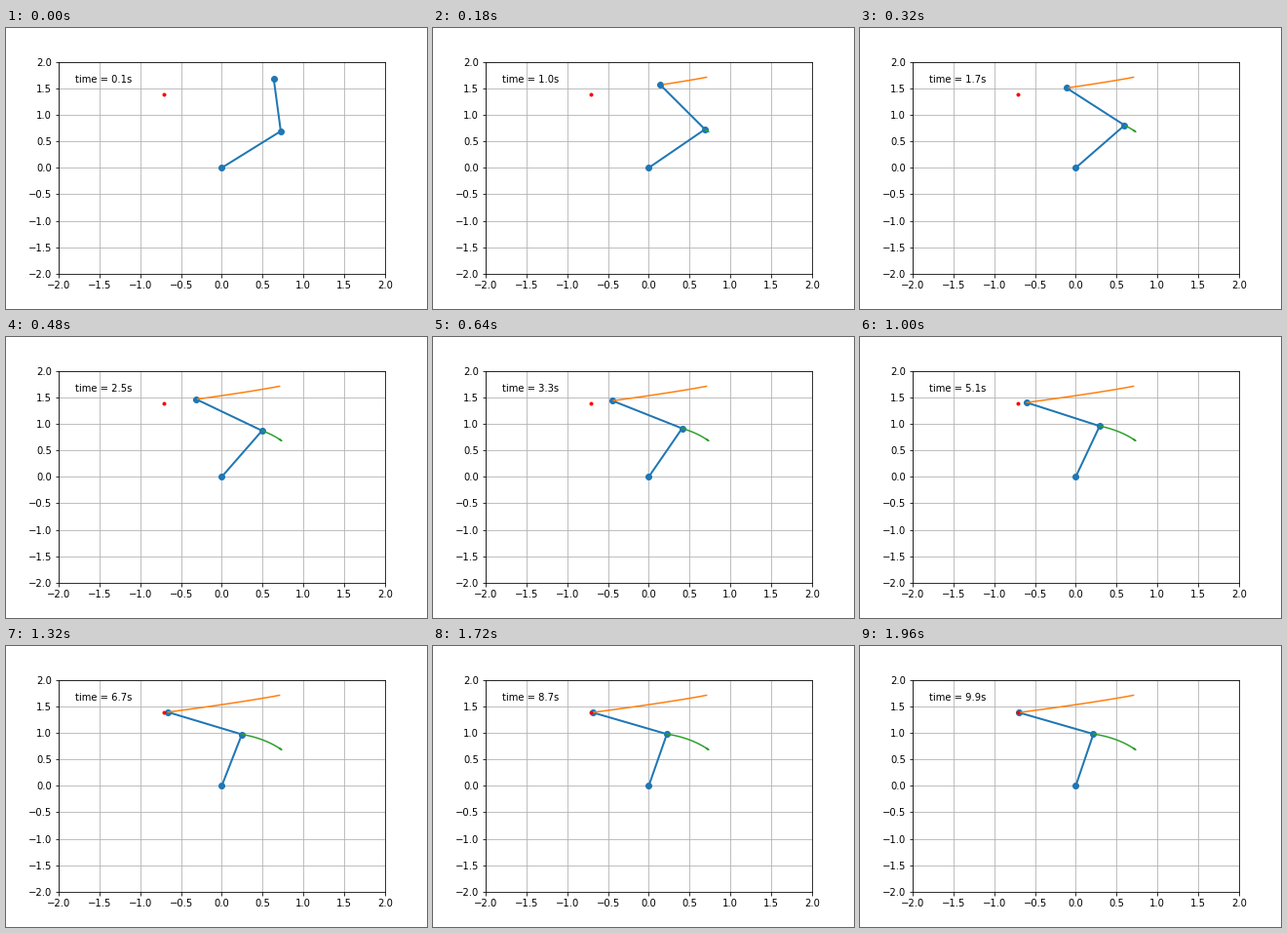
Recreate the animation shown at these times as a matplotlib script. Size 432 by 288 pixels, loop 1980 ms.

```python
import numpy as np
import matplotlib.pyplot as plt
from matplotlib.animation import FuncAnimation

DT = 0.1
STEPS = 100
GAIN = 0.5
TARGET = np.array([-0.707, 1.38])


def joints(q):
    """Elbow and tip of a two-link arm with unit links."""
    a, b = q[0], q[0] + q[1]
    elbow = np.array([np.cos(a), np.sin(a)])
    return elbow, elbow + [np.cos(b), np.sin(b)]


def jacobian(q):
    elbow, tip = joints(q)
    fore = tip - elbow
    return np.array([[-tip[1], -fore[1]], [tip[0], fore[0]]])


def simulate():
    """Drive the tip to the target with inverse-Jacobian control."""
    q = np.array([np.pi / 4, np.pi / 4])
    path = []
    for _ in range(STEPS):
        elbow, tip = joints(q)
        path.append((elbow, tip))
        q = q + DT * GAIN * np.linalg.solve(jacobian(q), TARGET - tip)
    return np.array(path)


path = simulate()
elbows, tips = path[:, 0], path[:, 1]

fig, ax = plt.subplots(figsize=(6, 4), dpi=72, facecolor="white")
fig.subplots_adjust(left=0.125, right=0.9, bottom=0.125, top=0.88)
ax.set(xlim=(-2, 2), ylim=(-2, 2))
ax.grid()

arm, = ax.plot([], [], "o-", lw=2)
tip_trail, = ax.plot([], [])
elbow_trail, = ax.plot([], [])
ax.plot(*TARGET, "r.")
label = ax.text(0.05, 0.9, "", transform=ax.transAxes)


def update(frame):
    i = frame + 1
    arm.set_data(*np.array([(0, 0), elbows[i], tips[i]]).T)
    tip_trail.set_data(*tips[:i].T)
    elbow_trail.set_data(*elbows[:i].T)
    label.set_text(f"time = {i * DT:.1f}s")
    return arm, tip_trail, elbow_trail, label


anim = FuncAnimation(fig, update, frames=STEPS - 1, interval=20,
                     repeat=True, repeat_delay=0)
plt.show()
```
